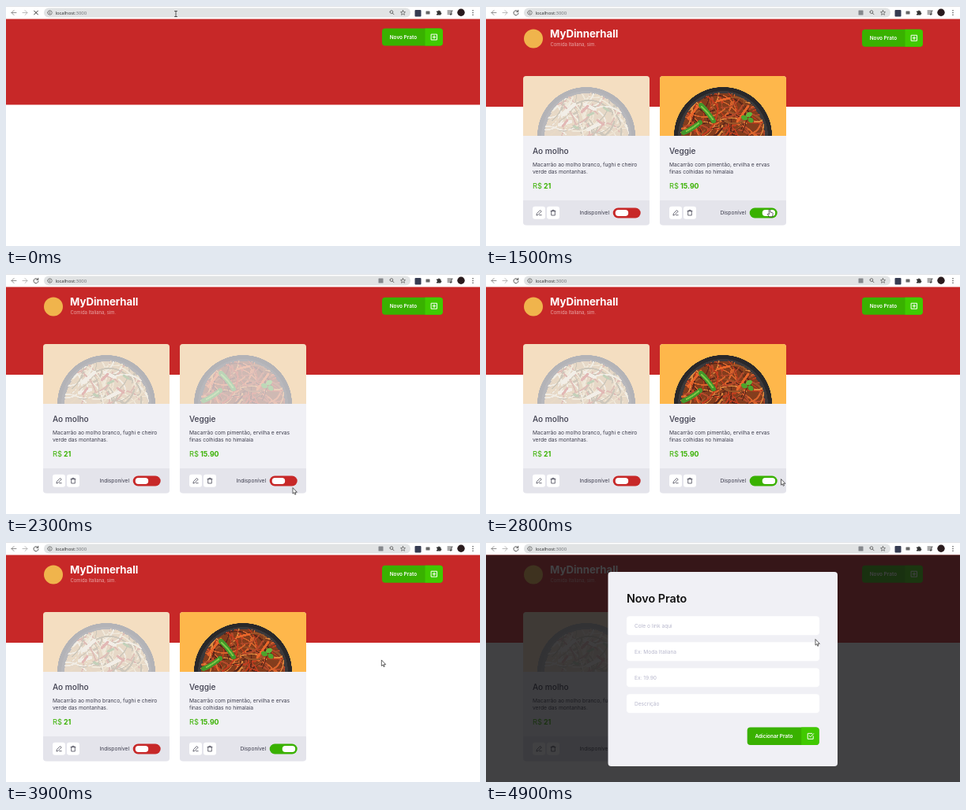
Write an HTML page with a canvas that moves like this. It is 600 by 305 pixels and loops after 5000 ms.

```html
<!DOCTYPE html>
<html lang="pt-BR">
<head>
<meta charset="utf-8">
<title>Cardápio</title>
<style>
html, body { margin: 0; width: 100%; height: 100%; overflow: hidden; background: #fff; }
canvas { display: block; width: 600px; height: 305px; }
</style>
</head>
<body>
<canvas id="stage"></canvas>
<script>
const LOOP = 5000, STEP = 100;
const LOADED = 200, SWITCH_OFF = 1900, SWITCH_ON = 2600, SLIDE = 200, MODAL = 4700;
const RED = '#c72828', GREEN = '#39b100', LIME = '#41c900', PANEL = '#f0f0f5', INK = '#3d3d4d';
const UI = 'Inter, sans-serif';

// time, x, y of the pointer tip
const TRAIL = [
  [0, 215, 10], [100, 222, 22], [300, 262, 92], [600, 293, 164], [700, 293, 164],
  [1200, 353, 262], [1500, 359, 259], [1900, 359, 259], [2300, 363, 272],
  [2500, 360, 261], [2700, 360, 261], [2900, 387, 261], [3300, 410, 247],
  [3500, 474, 231], [4100, 476, 110], [4600, 506, 41], [4700, 506, 42], [4900, 417, 124]
];

const canvas = document.getElementById('stage');
const scale = window.devicePixelRatio || 1;
canvas.width = 600 * scale;
canvas.height = 305 * scale;
let ctx = canvas.getContext('2d');

const clamp = v => Math.max(0, Math.min(1, v));

function box(x, y, w, h, r, color) {
  ctx.fillStyle = color;
  ctx.beginPath();
  ctx.roundRect(x, y, w, h, r);
  ctx.fill();
}

function disc(x, y, rx, ry, color, turn = 0) {
  ctx.fillStyle = color;
  ctx.beginPath();
  ctx.ellipse(x, y, rx, ry, turn, 0, Math.PI * 2);
  ctx.fill();
}

function text(str, x, y, size, color, weight = 400, align = 'left', family = UI) {
  ctx.font = `${weight} ${size}px ${family}`;
  ctx.textAlign = align;
  ctx.fillStyle = color;
  ctx.fillText(str, x, y);
}

function icon(x, y, d, stroke, width = 0.8, fill) {
  const path = new Path2D(d);
  ctx.save();
  ctx.translate(x, y);
  ctx.lineJoin = ctx.lineCap = 'round';
  if (fill) { ctx.fillStyle = fill; ctx.fill(path); }
  if (stroke) { ctx.strokeStyle = stroke; ctx.lineWidth = width; ctx.stroke(path); }
  ctx.restore();
}

function random(seed) {
  return () => (seed = (seed * 16807) % 2147483647) / 2147483647;
}

// Bowl of noodles, drawn once per dish
function makePhoto(seed, base, strands, extras) {
  const sheet = document.createElement('canvas'), page = ctx, rnd = random(seed);
  sheet.width = 160 * 3;
  sheet.height = 76 * 3;
  ctx = sheet.getContext('2d');
  ctx.scale(3, 3);
  box(0, 0, 160, 76, 0, '#feb74b');
  disc(80, 76, 62, 62, '#29282a');
  disc(80, 77, 57, 58, '#3b393b');
  disc(80, 78, 53, 56, base);
  ctx.save();
  ctx.beginPath();
  ctx.ellipse(80, 78, 54, 57, 0, 0, Math.PI * 2);
  ctx.clip();
  ctx.lineCap = 'round';
  for (let i = 0; i < 110; i++) {
    const x = 28 + rnd() * 104, y = 22 + rnd() * 56, turn = rnd() * Math.PI, len = 8 + rnd() * 14;
    const dx = Math.cos(turn) * len, dy = Math.sin(turn) * len;
    ctx.strokeStyle = strands[Math.floor(rnd() * strands.length)];
    ctx.lineWidth = 1 + rnd() * 1.4;
    ctx.beginPath();
    ctx.moveTo(x - dx, y - dy);
    ctx.quadraticCurveTo(x + dy * 0.6, y - dx * 0.6, x + dx, y + dy);
    ctx.stroke();
  }
  extras();
  ctx.restore();
  ctx = page;
  return sheet;
}

const creamy = makePhoto(11, '#cfa25c',
  ['#f0d9a0', '#e6c27c', '#f5e7c0', '#dba95a', '#b8502c', '#7f6a35'], () => {
    icon(58, 42, 'M-7 7L7 -6M-12 20L2 16M24 26L40 18M20 -6L32 0', '#f7ebc8', 4.5);
    icon(80, 50, 'M-6 -4L2 -12M14 6L22 12M-30 14L-24 6', '#c43a24', 3);
    icon(84, 46, 'M-2 4L5 1M18 -6L24 -2M-20 18L-15 20', '#5f8a34', 3);
  });

const veggie = makePhoto(29, '#843d1d',
  ['#d9632b', '#b3492a', '#df8a3e', '#59261a', '#c23c1e', '#9b5428'], () => {
    icon(76, 42, 'M-40 12L-24 -8M22 16L36 -4M-4 -10L12 -14', '#e8662a', 3);
    icon(60, 50, 'M-8 -13Q-2 -8 8 7M-30 22Q-20 18 -9 9', '#43962a', 6);
    icon(60, 50, 'M-7 -11Q-1 -6 7 5M-26 20Q-18 16 -11 10', '#7cc746', 2);
    disc(107, 53, 4, 3, '#4ea32c', 0.5);
    disc(113, 49, 4, 3, '#62b53a', -0.5);
    disc(115, 56, 4, 3, '#4ea32c', 0.8);
  });

function browser(loaded, translate) {
  box(0, 0, 600, 17, 0, '#fff');
  box(0, 0, 600, 1, 0, '#dee1e6');
  box(48, 2.5, 464, 12, 6, '#e1e3e4');
  const arrow = 'M3 0H-3M0 -3L-3 0 0 3';
  icon(10, 8.5, arrow, '#777');
  icon(24, 8.5, 'M-3 0H3M0 -3L3 0 0 3', '#aaa');
  if (loaded) icon(38, 8.5, 'M2.4 -1.6A3 3 0 1 0 3 .6M2.8 -3.2V-1.2H.8', '#444', 0.9);
  else icon(38, 8.5, 'M-2.4 -2.4L2.4 2.4M2.4 -2.4L-2.4 2.4', '#333', 1);
  icon(55.5, 8.5, 'M-2.7 0A2.7 2.7 0 1 0 2.7 0A2.7 2.7 0 1 0 -2.7 0M0 -.3V1.4M0 -1.5V-1.4', '#555', 0.7);
  const address = "'Open Sans', sans-serif";
  text('localhost', 62.5, 10.7, 5.9, '#2b2c2e', 400, 'left', address);
  text(':3000', 87, 10.7, 5.9, '#6c6f73', 400, 'left', address);
  if (translate) box(471.5, 5.5, 6, 6, 0.5, '#85888c');
  icon(488, 8, 'M-2 -.4A1.9 1.9 0 1 0 1.8 -.4A1.9 1.9 0 1 0 -2 -.4M1.3 1L3 2.8', '#555', 0.8);
  icon(502.5, 8.5, 'M0 -3L.9 -1 3 -.8 1.4 .7 1.9 2.8 0 1.7 -1.9 2.8 -1.4 .7 -3 -.8 -.9 -1Z', '#555', 0.7);
  box(517.5, 5, 8, 8.5, 1, '#363c52');
  box(531.5, 6.5, 5, 4, 0.5, '#666');
  icon(548, 8.5, 'M-3 -2H-1A1 1 0 0 1 1 -2H2.4V0A1 1 0 0 1 2.4 2V3H-3V1.4A1 1 0 0 0 -3 -.6Z', null, 0, '#333');
  icon(562, 8.5, 'M-3 -2.4H1.5M-3 -.4H1.5M-3 1.6H-.5M2 2V-2.4H3.2', '#444', 0.9);
  disc(561.8 + 1.2, 10.4, 1.2, 1.2, '#444');
  disc(576, 8.3, 4.7, 4.7, '#2a1b1d');
  for (const y of [5.7, 8.5, 11.3]) disc(591, y, 0.75, 0.75, '#444');
}

function actionButton(label, x, y, w, h, iconPath) {
  box(x, y, w, h, 4, GREEN);
  box(x + w - 22.5, y, 22.5, h, [0, 4, 4, 0], LIME);
  text(label, x + 9.7, y + h / 2 + 2.3, 6.45, '#fff', 600);
  icon(x + w - 11, y + h / 2, iconPath, '#fff', 1);
}

function header(loaded) {
  box(0, 16.5, 600, loaded ? 111.5 : 109, 0, RED);
  actionButton('Novo Prato', 476, loaded ? 29.7 : 28.5, 77, 22,
    'M-3.5 -3.5H3.5V3.5H-3.5ZM-1.8 0H1.8M0 -1.8V1.8');
  if (!loaded) return;
  disc(60, 41.5, 12, 12, '#f0b44c');
  text('MyDinnerhall', 81, 39.8, 13.2, '#fff', 700);
  text('Comida Italiana, sim.', 81.5, 50.7, 5.9, '#e8a5a5');
}

function toggle(x, y, on, slide) {
  box(x, y, 35, 13, 6.5, on ? GREEN : RED);
  box(x + 3 + 13 * slide, y + 2.5, 16.5, 8, 4, '#fff');
}

function card(x, dish, on, slide) {
  const y = 89;
  ctx.save();
  ctx.beginPath();
  ctx.roundRect(x, y, 160, 189.5, 4);
  ctx.clip();
  box(x, y, 160, 190, 0, PANEL);
  ctx.globalAlpha = on ? 1 : 0.3;
  ctx.drawImage(dish.photo, x, y, 160, 76);
  ctx.globalAlpha = 1;
  box(x, 247, 160, 32, 0, '#e4e4eb');
  ctx.restore();

  const left = x + 12;
  text(dish.name, left, 187.5, 10.1, INK, 500);
  dish.lines.forEach((line, i) => text(line, left, 204 + i * 9.3, 6.68, INK));
  text('R$', left, 231.7, 9.3, GREEN);
  text(dish.price, left + 14, 231.7, 8.8, GREEN, 700);

  box(left, 254.7, 16, 16, 3, '#fff');
  box(left + 18, 254.7, 16, 16, 3, '#fff');
  icon(left + 8, 262.7, 'M-3 3L-2.6 1 1.6 -3.2 3.2 -1.6 -1 2.6ZM.6 3H3.2', INK, 0.75);
  icon(left + 26, 262.7, 'M-3 -2H3M-2.3 -2V3.3H2.3V-2M-1.2 -2V-3.3H1.2V-2', INK, 0.75);
  text(on ? 'Disponível' : 'Indisponível', x + 109, 265.2, 6.65, INK, 400, 'right');
  toggle(x + 113.7, 256.5, on, slide);
}

const DISHES = [
  { photo: creamy, name: 'Ao molho', price: '21',
    lines: ['Macarrão ao molho branco, fughi e cheiro', 'verde das montanhas.'] },
  { photo: veggie, name: 'Veggie', price: '15.90',
    lines: ['Macarrão com pimentão, ervilha e ervas', 'finas colhidas no himalaia'] }
];

function modal() {
  box(0, 16.5, 600, 288.5, 0, 'rgba(18, 18, 20, 0.8)');
  box(154.5, 38, 290.5, 247, 4, PANEL);
  text('Novo Prato', 178, 76.8, 14.3, '#111', 600);
  ['Cole o link aqui', 'Ex: Moda Italiana', 'Ex: 19.90', 'Descrição'].forEach((hint, i) => {
    const y = 94.3 + i * 33;
    box(178, y, 244, 24, 4, '#fff');
    text(hint, 188, y + 14.2, 6.6, '#b7b7cc');
  });
  actionButton('Adicionar Prato', 330.7, 235.6, 91, 22.4,
    'M3.5 0V3.5H-3.5V-3.5H2M-1.5 -.6L0 1 4 -3.2');
}

function pointerAt(t) {
  const next = TRAIL.findIndex(k => k[0] > t);
  if (next < 0) return TRAIL[TRAIL.length - 1].slice(1);
  const [t0, x0, y0] = TRAIL[next - 1], [t1, x1, y1] = TRAIL[next];
  const k = (t - t0) / (t1 - t0);
  return [x0 + (x1 - x0) * k, y0 + (y1 - y0) * k];
}

function pointer(t) {
  const [x, y] = pointerAt(t);
  const over = (l, top, r, b) => x >= l && x <= r && y >= top && y <= b;
  if (y < 16) {
    icon(x, y, 'M-1.5 -3.5H1.5M0 -3.5V3.5M-1.5 3.5H1.5', '#333', 0.8);
  } else if (t < MODAL && (over(333, 256, 368, 270) || over(476, 30, 553, 52))) {
    icon(x, y, 'M-.8 0Q0 -.8 .8 0V3L3.6 3.7Q4.3 4 4.2 5L3.6 8.8H-.6L-2.8 5.6Q-2.4 4.4 -.8 5.5Z',
      '#222', 0.7, '#fff');
  } else {
    icon(x, y, 'M0 0V7.2L1.7 5.7 2.8 8.3 4 7.8 2.9 5.3H5Z', '#222', 0.7, '#fff');
  }
}

function draw(now) {
  const t = Math.floor((now % LOOP) / STEP) * STEP;
  const loaded = t >= LOADED;
  const on = t < SWITCH_OFF || t >= SWITCH_ON;
  const slide = 1 - clamp((t - SWITCH_OFF) / SLIDE) + clamp((t - SWITCH_ON) / SLIDE);

  ctx.setTransform(scale, 0, 0, scale, 0, 0);
  box(0, 0, 600, 305, 0, '#fff');
  browser(loaded, t >= 400);
  header(loaded);
  if (loaded) {
    card(47, DISHES[0], false, 0);
    card(220, DISHES[1], on, slide);
  }
  if (t >= MODAL) modal();
  pointer(t);
}

const start = performance.now();
function tick() {
  draw(performance.now() - start);
  requestAnimationFrame(tick);
}
tick();
</script>
</body>
</html>
```
